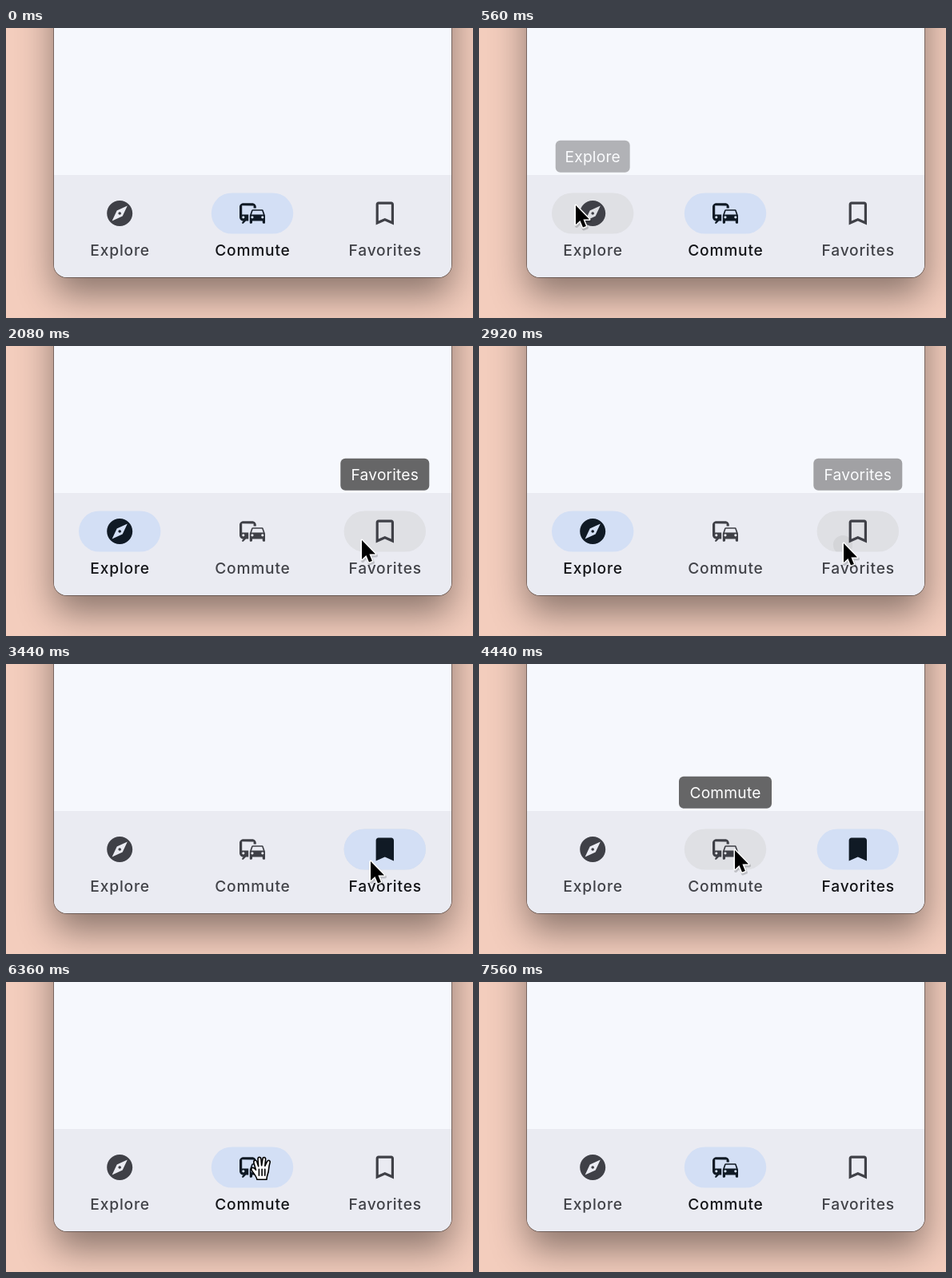
These frames come from a looping animation (584x363 px, 7600 ms). An HTML page:

```html
<!DOCTYPE html>
<html lang="en">
<head>
<meta charset="utf-8">
<title>Navigation bar</title>
<style>
html, body { margin: 0; width: 100%; height: 100%; overflow: hidden; background: #f3cdbd; }
#window {
  position: absolute; left: 59.5px; top: -400px; width: 497px; height: 711.5px;
  border-radius: 16px; overflow: hidden; background: #f6f8fd;
  box-shadow: 0 0 0 1px rgba(50, 42, 40, .5), 0 22px 46px rgba(0, 0, 0, .43);
}
#window::after {
  content: ""; position: absolute; left: 0; right: 0; bottom: 0; height: 127.5px; background: #eaebf2;
}
svg { position: absolute; left: 0; top: 0; width: 584px; height: 363px; }
text { font: 500 19.2px Inter, Roboto, sans-serif; letter-spacing: .8px; text-anchor: middle; }
.tip text { font-weight: 400; letter-spacing: .2px; fill: #fff; }
.tip rect { fill: #666667; }
</style>
</head>
<body>
<div id="window"></div>
<svg viewBox="0 0 584 363">
  <defs><clipPath id="pill"><rect x="-51.2" y="-25.6" width="102.4" height="51.2" rx="25.6"/></clipPath></defs>
  <g id="bar"></g>
  <g id="arrow" stroke-linejoin="round">
    <path d="M0 0V24L5.4 18.9 9 27.5 12.9 25.9 9.4 17.5H17Z" transform="translate(1 2)" fill="none" stroke="#000" stroke-opacity=".18" stroke-width="4"/>
    <path d="M0 0V24L5.4 18.9 9 27.5 12.9 25.9 9.4 17.5H17Z" stroke="#fff" stroke-width="3" paint-order="stroke"/>
  </g>
  <g id="hand" stroke="#000" stroke-width="1.6" stroke-linejoin="round" stroke-linecap="round">
    <path fill="#fff" d="M-5 14.5C-6 10-10 6-12 2.5-13-.5-10-1.5-8 1L-6.5 2.5-9-6C-10-9.5-6.5-11-5.3-8L-3.3-2-4-11C-4-14.5-.5-14.5 0-11L.6-3 2-11.5C2.6-14.5 6-13.5 5.6-10.5L4.8-2.5 7.4-8C9-11 12-9 11-6.2 9 0 10 3 8.5 7 7.5 10 7 11 7 14.5Z"/>
    <path d="M-2.6 1.5V9.5M1.1 1.5V9.5M4.8 1.5V9.5"/>
  </g>
</svg>
<script>
const LOOP = 7600;
const bookmark = 'M17 3H7c-1.1 0-1.99.9-1.99 2L5 21l7-3 7 3V5c0-1.1-.9-2-2-2z';
const compass = 'M12 10.9c-.61 0-1.1.49-1.1 1.1s.49 1.1 1.1 1.1 1.1-.49 1.1-1.1-.49-1.1-1.1-1.1zM12 2C6.48 2 2 6.48 2 12s4.48 10 10 10 10-4.48 10-10S17.52 2 12 2zm2.19 12.19L6 18l3.81-8.19L18 6l-3.81 8.19z';
const commute = 'M12 4H5C3.34 4 2 5.34 2 7v8c0 1.66 1.34 3 3 3l-1 1v1h1l2-2.03L9 18v-5H4V5.98L13 6v2h2V7c0-1.66-1.34-3-3-3zM5 14c.55 0 1 .45 1 1s-.45 1-1 1-1-.45-1-1 .45-1 1-1zm15.57-4.34c-.14-.4-.52-.66-.97-.66h-7.19c-.46 0-.83.26-.98.66L10 13.77l.01 5.51c0 .38.31.72.69.72h.62c.38 0 .68-.38.68-.76V18h8v1.24c0 .38.31.76.69.76h.61c.38 0 .69-.34.69-.72l.01-1.37v-4.14l-1.43-4.11zm-8.16.34h7.19l1.03 3h-9.25l1.03-3zM12 16c-.55 0-1-.45-1-1s.45-1 1-1 1 .45 1 1-.45 1-1 1zm8 0c-.55 0-1-.45-1-1s.45-1 1-1 1 .45 1 1-.45 1-1 1z';

// on: [selected, deselected], tips: [show, hide] pairs, press: touch down
const items = [
  { name: 'Explore', x: 142.2, tipW: 93, icon: compass, press: 1235, on: [[1358, 2990]], tips: [[500, 1250]] },
  { name: 'Commute', x: 308, tipW: 116, icon: commute, press: 4440, on: [[-999, 1358], [4550, 9999]], tips: [[1895, 1985], [3630, 4455]] },
  { name: 'Favorites', x: 473.8, tipW: 111, icon: bookmark + 'm0 15l-5-2.18L7 18V5h10v13z', filled: bookmark, press: 2880, on: [[2990, 4550]], tips: [[1930, 2890]] }
];
const path = [
  [340, 470, 370], [520, 120, 221], [830, 120, 221], [920, 124, 222], [1860, 124, 222],
  [1970, 444, 242], [2650, 444, 242], [2680, 455, 246], [3460, 455, 246], [3650, 319, 232],
  [6660, 319, 232], [6870, 610, 182]
];

const $ = id => document.getElementById(id);
const clamp = v => Math.max(0, Math.min(1, v));
const set = (el, attrs) => { for (const k in attrs) el.setAttribute(k, attrs[k]); };

for (const it of items) {
  const g = document.createElementNS('http://www.w3.org/2000/svg', 'g');
  const pill = (cls, fill) => `<rect class="${cls}" x="-51.2" y="-25.6" width="102.4" height="51.2" rx="25.6" fill="${fill}"/>`;
  set(g, { transform: `translate(${it.x} 232)` });
  g.innerHTML = pill('hover', '#dfe0e4') +
    '<g clip-path="url(#pill)"><circle class="ripple" fill="#000"/></g>' + pill('mark', '#d3dff5') +
    '<path class="icon" fill-rule="evenodd" transform="scale(1.6) translate(-12 -12)"/>' +
    `<text class="label" x=".4" y="53">${it.name}</text>` +
    `<g class="tip"><rect x="${-it.tipW / 2}" y="-91.2" width="${it.tipW}" height="40" rx="6"/><text y="-64">${it.name}</text></g>`;
  $('bar').append(g);
  for (const c of ['hover', 'ripple', 'mark', 'icon', 'label', 'tip']) it[c + 'El'] = g.querySelector('.' + c);
}

function pointer(t) {
  let a = path[0];
  for (const b of path) {
    if (t < b[0]) {
      const p = clamp((t - a[0]) / (b[0] - a[0])), e = p * p * (3 - 2 * p);
      return [a[1] + (b[1] - a[1]) * e, a[2] + (b[2] - a[2]) * e];
    }
    a = b;
  }
  return [a[1], a[2]];
}

// emphasized easing: short run-up, long settle
const emphasized = p => p < 1 / 6 ? .4 * (6 * p) ** 3 : 1 - .6 * (1 - (p - 1 / 6) * 1.2) ** 8;

function draw(t) {
  const [x, y] = pointer(t), isHand = t >= 6360;
  set($('arrow'), { transform: `translate(${x + 1} ${y + 1})`, visibility: isHand ? 'hidden' : 'visible' });
  set($('hand'), { transform: `translate(${x} ${y + .8})`, visibility: isHand ? 'visible' : 'hidden' });

  for (const it of items) {
    const hovered = !isHand && Math.abs(x - it.x) < 83 && y > 184 && y < 312;
    set(it.hoverEl, { opacity: +hovered });

    const age = t - it.press, [px, py] = pointer(it.press);
    set(it.rippleEl, {
      cx: px - it.x, cy: py - 229, r: Math.max(0, 8 + age * .1),
      opacity: age < 0 ? 0 : .075 * clamp(age / 60) * clamp(1 - (age - 140) / 220)
    });

    let selected = false, scale = 0, alpha = 0;
    for (const [on, off] of it.on) {
      if (t < on || t > off + 100) continue;
      selected = t < off;
      scale = .4 + .6 * emphasized(clamp((t - on) / 500));
      alpha = clamp((t - on) / 100) * clamp(1 - (t - off) / 100);
    }
    set(it.markEl, { transform: `scale(${scale} 1)`, opacity: alpha });
    set(it.iconEl, { d: selected && it.filled || it.icon, fill: selected ? '#101a25' : '#3f4047' });
    set(it.labelEl, { fill: selected ? '#121317' : '#414248' });

    const tip = it.tips.map(([a, b]) => clamp((t - a) / 130) * clamp(1 - (t - b) / 75));
    set(it.tipEl, { opacity: Math.max(...tip) });
  }
}

const start = performance.now();
function tick() {
  draw((performance.now() - start) % LOOP);
  requestAnimationFrame(tick);
}
tick();
</script>
</body>
</html>
```
